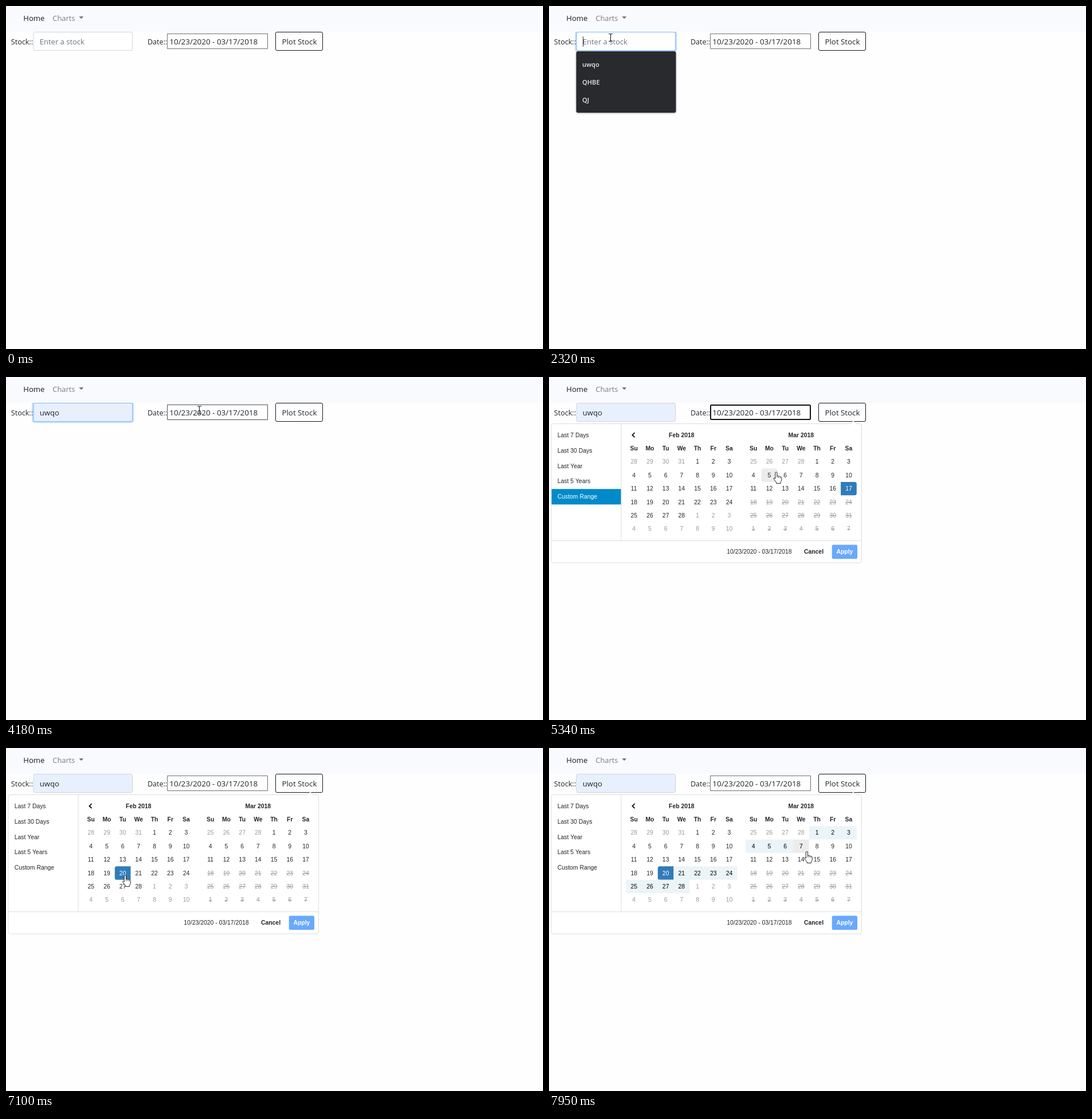
Animation of 937 by 598 pixels, one loop 8 s. Source, as an HTML page with a canvas:

```html
<!DOCTYPE html>
<html lang="en">
<head>
<meta charset="utf-8">
<title>Stock date picker</title>
<style>
  html, body { margin: 0; width: 100%; height: 100%; overflow: hidden; background: #fefefe; }
  canvas { display: block; }
</style>
</head>
<body>
<canvas id="stage" width="937" height="598"></canvas>
<script>
const ctx = document.getElementById('stage').getContext('2d');
const LOOP = 8000;
const UI = '"Open Sans", sans-serif', SMALL = '"Liberation Sans", Arial, sans-serif';
const INK = '#212529', MUTED = '#999';
const STOCK = 'uwqo', SUGGESTIONS = [STOCK, 'QHBE', 'QJ'];
const RANGE = '10/23/2020 - 03/17/2018';

// Moments of the clicks
const FOCUS_STOCK = 1220, PICK_STOCK = 3560, OPEN_PICKER = 4640, PICK_START = 7100;

const smooth = p => p * p * (3 - 2 * p);
const easeOut = p => 1 - (1 - p) ** 2;

// Pointer moves: first step, last step, number of steps, end point, easing
const START = [893, 602];
const MOVES = [
  [380, 990, 9, 107.5, 55, smooth],
  [3160, 3390, 4, 93, 95, smooth],
  [3800, 4180, 6, 337.5, 57.5, smooth],
  [5100, 5340, 4, 396.5, 166, smooth],
  [5640, 6260, 9, 210, 216, easeOut],
  [6340, 6410, 2, 203, 224, smooth],
  [6640, 6720, 2, 208, 222, smooth],
  [7410, 7640, 4, 353, 212, easeOut],
  [7720, 7950, 4, 450, 181, easeOut]
];

function stepped(t, start, end, count) {
  if (t < start) return 0;
  return Math.min(1, (Math.floor((t - start) / (end - start) * (count - 1) + 1e-6) + 1) / count);
}

function pointerAt(t) {
  let [x, y] = START;
  for (const [start, end, count, endX, endY, ease] of MOVES) {
    const p = ease(stepped(t, start, end, count));
    x += (endX - x) * p;
    y += (endY - y) * p;
  }
  return { x, y };
}

// Calendar days are numbered from 28 January 2018
const CELL_W = 27.7, CELL_H = 23.4, GRID_Y = 136.1;
const MONTHS = [
  { name: 'Feb 2018', x: 134.4, first: 0, lastCell: 31 },
  { name: 'Mar 2018', x: 342.9, first: 28, lastCell: 34 }
];
const START_DAY = 23, LAST_DAY = 48;

function cellAt({ x, y }) {
  const row = Math.floor((y - GRID_Y) / CELL_H);
  if (row < 0 || row > 5) return null;
  for (const month of MONTHS) {
    const col = Math.floor((x - month.x) / CELL_W);
    if (col < 0 || col > 6) continue;
    const i = row * 7 + col, day = month.first + i;
    return { month, day, disabled: day > LAST_DAY, inMonth: i >= 4 && i <= month.lastCell };
  }
  return null;
}

function rangeEndAt(t) {
  let end = START_DAY;
  for (let time = PICK_START; time <= t; time += 10) {
    const cell = cellAt(pointerAt(time));
    if (cell && cell.inMonth && !cell.disabled) end = cell.day;
  }
  return end;
}

function text(str, x, y, size, color = INK, { font = UI, weight = 400, align = 'left' } = {}) {
  ctx.font = `${weight} ${size}px ${font}`;
  ctx.textAlign = align;
  ctx.fillStyle = color;
  ctx.fillText(str, x, y);
}

const small = (str, x, y, color, options) => text(str, x, y, 10.4, color, { font: SMALL, ...options });
const centered = (str, x, y, color, weight = 400) => small(str, x, y, color, { weight, align: 'center' });

function box(x, y, w, h, { fill, stroke, radius = 0, line = 1 }) {
  ctx.beginPath();
  ctx.roundRect(x, y, w, h, radius);
  if (fill) { ctx.fillStyle = fill; ctx.fill(); }
  if (stroke) { ctx.strokeStyle = stroke; ctx.lineWidth = line; ctx.stroke(); }
}

function shape(path, { fill, stroke, line = 1 }) {
  const p = new Path2D(path);
  if (fill) { ctx.fillStyle = fill; ctx.fill(p); }
  if (stroke) { ctx.strokeStyle = stroke; ctx.lineWidth = line; ctx.stroke(p); }
}

function drawNav() {
  ctx.fillStyle = '#f8fafd';
  ctx.fillRect(0, 0, 937, 45);
  text('Home', 30.3, 26, 13.1, '#191a1c');
  text('Charts', 81.3, 26, 12.9, '#7c7d7e');
  shape('M127.3 18.3h8l-4 4z', { fill: '#6c6d6e' });
}

function drawForm() {
  text('Stock::', 8.8, 67, 12.6);
  text('Date::', 247, 67, 12.5);
  box(470.5, 45.5, 82, 32, { fill: '#fefefe', stroke: '#151719', radius: 2.5 });
  text('Plot Stock', 481.5, 67, 13.3);
}

function drawFocusRing(focus) {
  box(45.2, 42.7, 178, 37.6, { fill: `rgba(0,123,255,${0.25 * focus})`, radius: 5 });
}

function drawStock(t, pointer, focus) {
  const open = t >= FOCUS_STOCK && t < PICK_STOCK;
  const preview = open && pointer.y > 86;
  const filled = preview || t >= PICK_STOCK;
  box(48, 45.5, 172.5, 32, { fill: filled ? '#e8f0fe' : '#fff', stroke: '#ced4da', radius: 2.5 });
  if (focus > 0) box(48, 45.5, 172.5, 32, { stroke: `rgba(128,189,255,${focus})`, radius: 2.5 });
  if (filled) text(STOCK, 58.8, 67.3, 13.1, INK);
  else text('Enter a stock', 58.8, 67.3, 13, '#6c757d');
  if ((t >= FOCUS_STOCK && t < 1770) || (t >= 2320 && t < 2780)) {
    ctx.fillStyle = '#333';
    ctx.fillRect(59, 53, 1, 18);
  }
  if (!open) return;
  ctx.save();
  ctx.shadowColor = 'rgba(0,0,0,.35)';
  ctx.shadowBlur = 3;
  ctx.shadowOffsetY = 1;
  box(47.5, 79, 174, 107, { fill: '#292a2d', radius: 3 });
  ctx.restore();
  if (preview) box(47.5, 86, 174, 31, { fill: '#3f4043' });
  SUGGESTIONS.forEach((name, i) =>
    text(name, 58, 105.7 + 31 * i, 11.1, '#e8eaed', { weight: 600 }));
}

function drawDate(t, pointer) {
  const focused = t >= OPEN_PICKER && t < PICK_START;
  const hover = pointer.x > 281 && pointer.x < 457 && pointer.y > 48 && pointer.y < 75;
  if (focused) box(282, 49, 174, 25, { fill: '#fff', stroke: '#101010', radius: 1.5, line: 2 });
  else box(281.5, 48.5, 175, 26, { fill: '#fff', stroke: hover ? '#4f4f4f' : '#6f6f6f' });
  text(RANGE, 285.3, 67, 13.45);
  const caretOn = t < 5100 || (t >= 5640 && t < 6180) || t >= 6680;
  if (focused && caretOn) {
    ctx.fillStyle = '#222';
    ctx.fillRect(333, 52, 1, 20);
  }
}

function drawMonth(month, t, hovered, rangeEnd) {
  const centerX = col => month.x + (col + 0.5) * CELL_W;
  const picking = t >= PICK_START;
  centered(month.name, centerX(3), 104.6, INK, 700);
  ['Su', 'Mo', 'Tu', 'We', 'Th', 'Fr', 'Sa'].forEach((name, col) =>
    centered(name, centerX(col), 128.3, INK, 700));
  for (let i = 0; i < 42; i++) {
    const col = i % 7, day = month.first + i;
    const x = month.x + col * CELL_W, y = GRID_Y + Math.floor(i / 7) * CELL_H;
    const inMonth = i >= 4 && i <= month.lastCell, disabled = day > LAST_DAY;
    const active = inMonth && day === (picking ? START_DAY : LAST_DAY);
    const inRange = inMonth && picking && day > START_DAY && day <= rangeEnd;
    const isHovered = inMonth && !disabled && hovered && hovered.month === month && hovered.day === day;
    let fill = null;
    if (active) fill = '#307cb9';
    else if (isHovered) fill = '#ececec';
    else if (inRange) fill = '#ebf4f8';
    const radius = active ? (picking ? [3.5, 0, 0, 3.5] : [0, 3.5, 3.5, 0]) : isHovered && !picking ? 3.5 : 0;
    if (fill) box(x, y, CELL_W, CELL_H, { fill, radius });
    const label = String(new Date(2018, 0, 28 + day).getDate());
    const color = active ? '#fff' : disabled || !inMonth ? MUTED : inRange ? '#000' : INK;
    centered(label, centerX(col), y + 15.2, color);
    if (disabled) {
      const half = label.length * 2.9;
      ctx.fillStyle = MUTED;
      ctx.fillRect(centerX(col) - half, Math.round(y + 11.4), half * 2, 1);
    }
  }
}

function drawPicker(t, pointer) {
  if (t < OPEN_PICKER) return;
  box(4, 81.5, 541.5, 242.5, { fill: '#fff', stroke: '#ddd', radius: 3.5 });
  shape('M525.5 82L531 76.5L536.5 82', { fill: '#fff', stroke: '#ddd' });
  shape('M126 82V285M4 285.5H545.5', { stroke: '#ddd' });
  ['Last 7 Days', 'Last 30 Days', 'Last Year', 'Last 5 Years', 'Custom Range'].forEach((name, i) => {
    const selected = i === 4 && t < PICK_START;
    if (selected) box(4.5, 195.3, 121, 27, { fill: '#008aca' });
    small(name, 14.7, 104.8 + 26.85 * i, selected ? '#fff' : INK);
  });
  shape('M149.5 97.2L145.5 101.2L149.5 105.2', { stroke: '#111', line: 1.9 });
  const hovered = cellAt(pointer), rangeEnd = rangeEndAt(t);
  MONTHS.forEach(month => drawMonth(month, t, hovered, rangeEnd));
  small(RANGE, 310.3, 308, INK);
  centered('Cancel', 462, 308, INK, 700);
  box(493.7, 292.5, 44.3, 24.5, { fill: '#68a9fd', radius: 2.5 });
  centered('Apply', 515.9, 308, '#fff', 700);
}

const CURSORS = {
  arrow() {
    shape('M0 0V15.5L3.6 12.2L6 17.8L8.3 16.8L6 11.3H11z', { fill: '#fff', stroke: '#111' });
  },
  beam() {
    shape('M-3.5 -6.5H-1L0 -5.5L1 -6.5H3.5M0 -5.5V5.5M-3.5 6.5H-1L0 5.5L1 6.5H3.5', { stroke: '#222', line: 1.2 });
  },
  hand() {
    shape('M-1.7 1Q-1.5 -.4 0 -.4Q1.4 -.4 1.5 1V6.5Q3.3 5.7 4 7.1Q5.9 6.3 6.7 8Q9 7.4 9.3 9.5V13.5Q9 16 7.5 17.5V19.5H.3V18L-3.8 12.5Q-5 10.5 -3.6 10Q-2.5 9.7 -1.7 11.3z',
      { fill: '#fff', stroke: '#222' });
    shape('M1.5 6.5V9.5M4 7.5V10M6.7 8.5V10.5', { stroke: '#222', line: .8 });
  },
  blocked() {
    shape('M6 0A6 6 0 1 1 -6 0A6 6 0 1 1 6 0M-4.2 -4.2L4.2 4.2', { fill: '#fff', stroke: '#d30b0b', line: 2 });
  }
};

function cursorFor(t, { x, y }) {
  const inField = y > 45 && y < 78 && ((x > 48 && x < 221) || (x > 281 && x < 457));
  if (inField) return 'beam';
  const cell = t >= OPEN_PICKER && cellAt({ x, y });
  if (cell) return cell.disabled ? 'blocked' : 'hand';
  return 'arrow';
}

function drawPointer(t, pointer) {
  if (t < MOVES[0][0]) return;
  ctx.save();
  ctx.translate(pointer.x, pointer.y);
  CURSORS[cursorFor(t, pointer)]();
  ctx.restore();
}

function frame(now) {
  const t = now % LOOP, pointer = pointerAt(t);
  const focus = stepped(t, FOCUS_STOCK, 1390, 3) - stepped(t, OPEN_PICKER, 4800, 3);
  ctx.fillStyle = '#fefefe';
  ctx.fillRect(0, 0, 937, 598);
  // The navigation bar covers the top of the focus ring
  if (focus > 0) drawFocusRing(focus);
  drawNav();
  drawForm();
  drawStock(t, pointer, focus);
  drawDate(t, pointer);
  drawPicker(t, pointer);
  drawPointer(t, pointer);
  requestAnimationFrame(frame);
}
requestAnimationFrame(frame);
</script>
</body>
</html>
```
